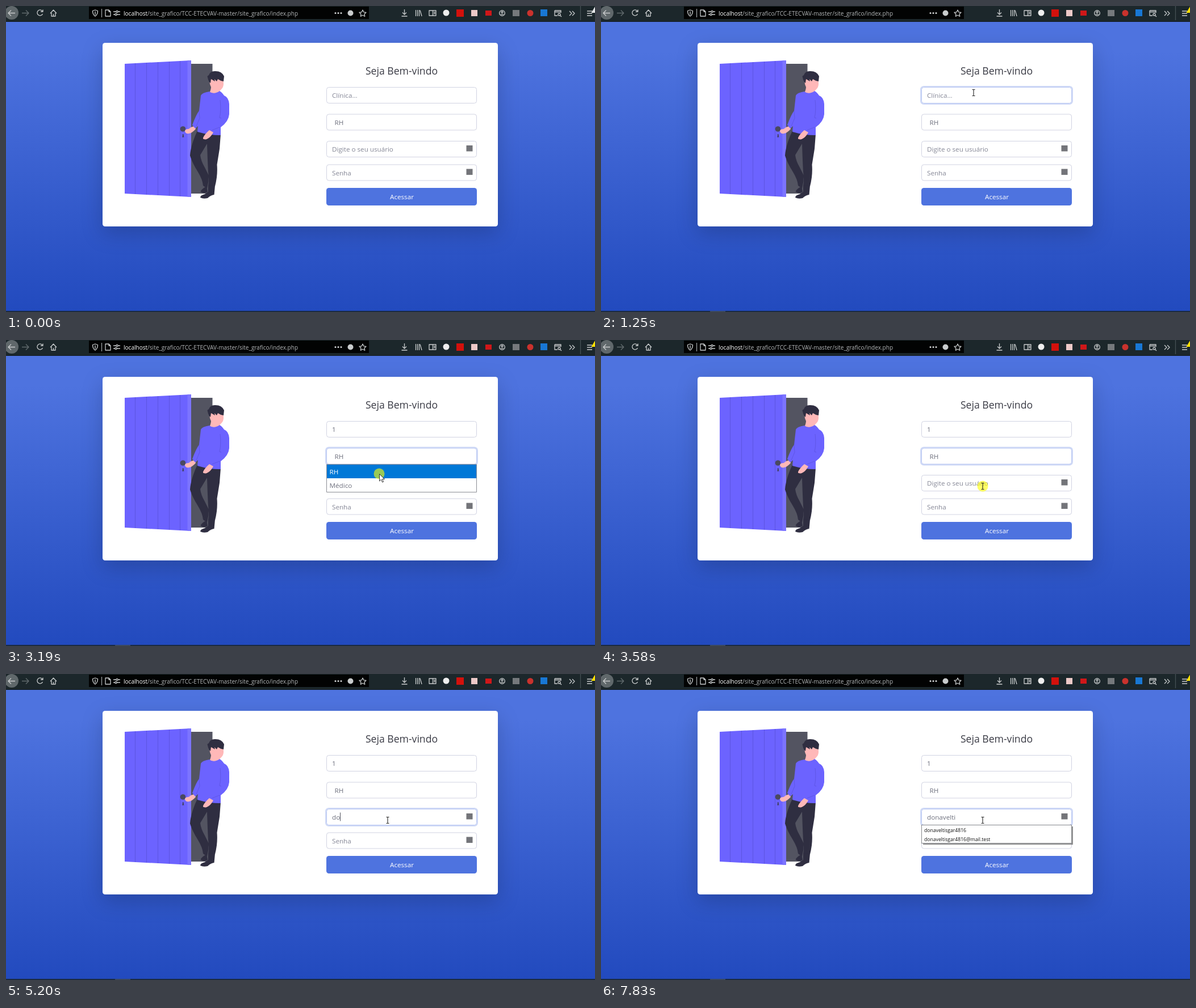
An HTML page for the animation above (8 s loop, 1037 by 540 pixels).

```html
<!DOCTYPE html>
<html lang="pt-BR">
<head>
<meta charset="utf-8">
<title>Seja Bem-vindo</title>
<style>
  html, body { margin: 0; width: 100%; height: 100%; overflow: hidden; background: #224abe; }
  svg { display: block; width: 100vw; height: 100vh; }
  text { font: 11.66px "Open Sans", "Noto Sans", sans-serif; fill: #6e707e; white-space: pre; }
  .hint { fill: #858796; }
  .small { font-size: 8.65px; fill: #111; }
  .card { filter: drop-shadow(0 12px 18px rgba(0, 0, 0, .18)); }
  .icon { fill: none; stroke: #c9cccd; stroke-width: 1.3; stroke-linejoin: round; }
  .field { fill: #fff; stroke: #d1d3e2; }
  .focus .field { stroke: #bac8f3; }
  .ring { fill: none; stroke: #4e73df; stroke-opacity: .27; stroke-width: 2.4; visibility: hidden; }
  .focus .ring { visibility: visible; }
</style>
</head>
<body>
<svg viewBox="0 0 1037 540" preserveAspectRatio="none">
  <defs>
    <linearGradient id="sky" x1="0" y1="0" x2="0" y2="1">
      <stop offset=".1" stop-color="#4e73df"/><stop offset="1" stop-color="#224abe"/>
    </linearGradient>
  </defs>
  <rect y="28" width="1037" height="512" fill="url(#sky)"/>
  <rect y="538" width="1037" height="2" fill="#1b2b42"/>
  <rect id="taskbar" x="192" y="538" width="27" height="2" fill="#3b4960"/>

  <!-- browser toolbar -->
  <rect width="1037" height="28" fill="#1c272b"/>
  <rect y="27" width="1037" height="1" fill="#11191d"/>
  <rect x="146" y="1" width="493" height="22" fill="#020303"/>
  <circle cx="10" cy="12" r="12" fill="#60686b"/>
  <g class="icon">
    <path d="M4 12.5H16M9 7.5L4 12.5L9 17.5"/>
    <path d="M28 12.5H40M35 7.5L40 12.5L35 17.5" stroke="#626b6e"/>
    <path d="M64 9A5 5 0 1 0 64.500 14M65 6.500V10H61"/>
    <path d="M78 13L83.500 7L89 13M80 12V18H87V12M83.500 18V14"/>
    <path d="M157 7L161.500 8.500Q161.500 15 157 18Q152.500 15 152.500 8.500ZM157 9.500V15.500"/>
    <path d="M168.500 5V20" stroke="#9da1a3"/>
    <path d="M175 7H181L184 10V18H175ZM181 7V10H184"/>
    <path d="M189 10H194M197 10H201M189 15H192M195 15H201"/>
    <circle cx="195.500" cy="10" r="1.600"/><circle cx="193.500" cy="15" r="1.600"/>
    <path d="M628 7L629.800 10.800L634 11.300L631 14.200L631.700 18.300L628 16.300L624.300 18.300L625 14.200L622 11.300L626.200 10.800Z"/>
    <path d="M701.500 6V15M698 11.500L701.500 15L705 11.500M696.500 18H706.500"/>
    <path d="M721.500 7V18M724.500 7V18M727.500 7V18M729 7.500L732 18"/>
    <path d="M745 8H757V17H745ZM751.500 8V17M753 11H756M753 13.500H756"/>
    <circle cx="873.500" cy="12.500" r="4.800"/><circle cx="873.500" cy="11" r="1.500"/><path d="M871 15H876"/>
    <path d="M966 8H977V12M966 8V17H971M966 10.500H977"/><circle cx="974" cy="15" r="2"/><path d="M975.500 16.500L978 19"/>
    <path d="M992 9L996 13L992 17M997 9L1001 13L997 17"/>
    <path d="M1011.500 0V25" stroke="#465055"/>
    <path d="M1023 9H1032M1023 13H1032M1023 17H1032"/>
  </g>
  <g fill="#d5d7d8"><circle cx="580" cy="12.500" r="1.500"/><circle cx="585" cy="12.500" r="1.500"/><circle cx="590" cy="12.500" r="1.500"/></g>
  <circle cx="606.500" cy="12.500" r="5" fill="#c9cccd"/>
  <circle cx="775" cy="12" r="5.500" fill="#eee"/>
  <rect x="793" y="6" width="13" height="13" fill="#d3110c"/>
  <rect x="819" y="7" width="11" height="11" fill="#ecc9c8"/>
  <rect x="844" y="8" width="11" height="9" fill="#cf1719"/>
  <rect x="892" y="7" width="12" height="11" fill="#75797c"/>
  <circle cx="923" cy="12.500" r="5.500" fill="#c9322d"/>
  <rect x="941" y="6" width="12" height="12" fill="#1877d4"/>
  <path id="badge" d="M1037 1L1030.500 12H1043.500Z"/>
  <text x="207" y="17" style="font-size:10.05px;fill:#b5b8ba"><tspan fill="#fff">localhost</tspan>/site_grafico/TCC-ETECVAV-master/site_grafico/index.php</text>

  <rect class="card" x="170" y="65" width="696" height="324" rx="4.500" fill="#fff"/>

  <!-- door -->
  <path d="M326 102H363.500V331H326Z" fill="#535461"/>
  <path d="M209 102L326 96V337L209 331Z" fill="#6c63ff"/>
  <path d="M319.500 96.300L326 96V337L319.500 336.700Z" fill="#7c74ff"/>
  <path d="M227.500 101V332M247.500 100V333M267.500 99V334M287.500 98V335M306.500 97V336" fill="none" stroke="#5c54e0"/>
  <circle cx="311.500" cy="217" r="4.800" fill="#4a4960"/>
  <path d="M310.500 226.500H313L312.600 229L313.500 231.500H310L311 229Z" fill="#3f3d56"/>

  <!-- visitor -->
  <g fill="#2f2e41">
    <path d="M337 220L378 226L376 252L371.500 280Q373 299 368 318L356 318Q358 305 356 293Q355 276 354 243L342 263Q343 273 350 285L357 299Q357 310 354 322L347 317Q346 306 338 293Q328 277 324 264Q325 246 337 220Z"/>
    <path d="M353 318L347 322Q342 326 343 328Q348 332 355 328Z"/>
    <path d="M356 316L368 317L366.500 333Q360 334 355 339Q347 341 342 338Q342 334 350 332L356 328Z"/>
  </g>
  <g fill="#ffb8b8">
    <path d="M333 212Q325 213 322 217Q315 217 315 221Q316 226 322 225Q328 224 334 217Z"/>
    <path d="M358 219L365 223Q360 232 353 235Q347 236 347 233Q350 226 358 219Z"/>
    <path d="M359 128L382 128Q385 141 380 146Q376 149 375 153L367 158L358 154Q361 147 361 143Q357 135 359 128Z"/>
  </g>
  <path d="M358 151Q366 157 376 150Q380 152 384 158Q392 161 393 173V191Q392 204 378 214L378 228Q357 228 337 222L338 212L333 216L328 210Q335 191 340 185L343 158Q345 153 358 151Z" fill="#6c63ff"/>
  <path d="M377 166Q379 185 376 197L379 198M363 219L376 214M340 185L341 198L335 212" fill="none" stroke="#5c54e0" stroke-width=".8"/>
  <path d="M358 219L365 223Q360 232 353 235Q347 236 347 233Q350 226 358 219Z" fill="#ffb8b8"/>
  <path d="M356 130L354.500 124L357 122Q360 114 369 115Q380 115 384 124L383 133Q377 132 373 129L371 133L367 129L368 133L361 129L360 136Q357 134 356 130Z" fill="#2f2e41"/>

  <text x="696.500" y="121" text-anchor="middle" style="font-size:17.6px;fill:#3a3b45">Seja Bem-vindo</text>
  <g id="fields"></g>
  <rect x="564" y="321" width="265" height="31" rx="4.500" fill="#4e73df"/>
  <text x="697" y="341" text-anchor="middle" style="fill:#fff">Acessar</text>

  <g id="options">
    <path d="M564.500 219.500H828.500V268.500H564.500Z" fill="#fff" stroke="#8b8d94"/>
    <path d="M565 220H828V244H565Z" fill="#0078d7"/>
    <text x="569.500" y="237" style="fill:#fff">RH</text>
    <text x="569.500" y="261">Médico</text>
  </g>
  <g id="suggest">
    <rect id="shade" x="567" y="269" width="264" fill="#000" opacity=".42"/>
    <rect id="panel" x="564.500" y="266.500" width="264" fill="#fff" stroke="#85878c"/>
    <text class="small" x="569" y="279"></text>
    <text class="small" x="569" y="294.500"></text>
    <text class="small" x="569" y="310"></text>
  </g>
  <g id="tooltip">
    <path d="M670.500 274.500H769.500V289.500H670.500Z" fill="#fff" stroke="#666"/>
    <text class="small" x="675" y="286">Preencha este campo.</text>
  </g>
  <rect id="caret" width="1" height="15" fill="#50525f"/>
  <g id="cursor">
    <circle id="click" r="9.500" fill="#ff0" opacity=".6"/>
    <path id="arrow" d="M.5 .5V13L3.500 10.200L5.600 15L7.600 14.100L5.600 9.500H9.500Z" fill="#fff" stroke="#222" stroke-width=".9"/>
    <path id="beam" d="M-2.500 -5.500H-.7L0 -5L.7 -5.500H2.500M0 -5V5M-2.500 5.500H-.7L0 5L.7 5.500H2.500" fill="none" stroke="#222" stroke-width="1.100"/>
  </g>
</svg>
<script>
const LOOP = 8000;
const $ = id => document.getElementById(id);
const show = (id, on) => $(id).setAttribute("visibility", on ? "visible" : "hidden");

const fields = [
  { y: 143, x: 574, hint: "Clínica..." },
  { y: 190.5, x: 578.5, value: "RH" },
  { y: 238, x: 574, hint: "Digite o seu usuário", badge: true },
  { y: 279.5, x: 574, hint: "Senha", badge: true }
];
$("fields").innerHTML = fields.map(({ y, x, badge }) => `<g>
  <rect class="ring" x="563.2" y="${y - .8}" width="266.600" height="30.600" rx="5"/>
  <rect class="field" x="564.5" y="${y + .5}" width="264" height="28" rx="4"/>
  <text x="${x}" y="${y + 19.3}"></text>
  ${badge ? `<rect x="810.5" y="${y + 8}" width="11" height="10.500" fill="#737479"/>` : ""}</g>`).join("");
const groups = [...$("fields").children];
const labels = groups.map(g => g.querySelector("text"));
const rows = [...$("suggest").querySelectorAll("text")];

const long = ["donaveltisgar4816", "Donavel_Tisgar", "donaveltisgar4816@mail.test"];
const short = [long[0], long[2]];

// Each step changes part of the state that came before it.
const steps = [
  [0, { focus: -1, clinic: "", user: "", caret: false, list: [] }],
  [690, { click: true, focus: 0, caret: true }],
  [760, { click: false }],
  [830, { alert: true }],
  [1250, { caret: false }],
  [1720, { caret: true }],
  [1800, { clinic: "1" }],
  [2570, { click: true }],
  [2640, { click: false, focus: 1, open: true }],
  [3190, { click: true }],
  [3270, { click: false, open: false }],
  [3580, { click: true }],
  [3650, { click: false, focus: 2, caret: true }],
  [4110, { tip: true }],
  [4190, { caret: false }],
  [4650, { caret: true }],
  [5120, { user: "d", tip: false }],
  [5200, { user: "do" }],
  [5280, { list: long }],
  [5430, { user: "don" }],
  [5660, { user: "dona" + "v" }],
  [5810, { user: "donave" }],
  [5900, { user: "donavel" }],
  [6210, { caret: false }],
  [6760, { caret: true }],
  [7220, { user: "donavelt", caret: true }],
  [7290, { user: "donavelti" }],
  [7370, { list: short }],
  [7830, { caret: false }]
];

// time, x, y of the pointer
const path = [
  [70, 736, 52], [200, 690, 115], [310, 612, 200], [390, 640, 170], [470, 656, 153],
  [2260, 656, 153], [2490, 663, 206], [2720, 663, 206], [3040, 658, 234], [3110, 657, 236],
  [3270, 657, 236], [3500, 672, 258]
];

function pointerAt(t) {
  const next = path.findIndex(p => p[0] > t);
  if (next < 0) return path.at(-1).slice(1);
  if (next === 0) return null;
  const [a, b] = [path[next - 1], path[next]];
  const k = (t - a[0]) / (b[0] - a[0]);
  return [a[1] + (b[1] - a[1]) * k, a[2] + (b[2] - a[2]) * k];
}

function drawPointer(t, state) {
  const point = pointerAt(t);
  show("cursor", point);
  if (!point) {
    ["click", "arrow", "beam"].forEach(id => show(id, false));
    return;
  }
  const [x, y] = point;
  const overInput = !state.open && x > 564 && x < 829 &&
    [0, 2, 3].some(i => y > fields[i].y && y < fields[i].y + 29);
  $("cursor").setAttribute("transform", `translate(${Math.round(x)} ${Math.round(y)})`);
  show("click", state.click);
  show("arrow", !overInput);
  show("beam", overInput);
}

function draw(t) {
  const state = Object.assign({}, ...steps.filter(s => s[0] <= t).map(s => s[1]));
  const values = [state.clinic, "RH", state.user, ""];
  fields.forEach((field, i) => {
    groups[i].setAttribute("class", i === state.focus ? "focus" : "");
    labels[i].textContent = values[i] || field.hint;
    labels[i].setAttribute("class", values[i] ? "" : "hint");
  });

  const typing = state.focus === 0 || state.focus === 2;
  show("caret", state.caret && typing);
  if (typing) {
    const i = state.focus;
    const width = values[i] ? labels[i].getComputedTextLength() : 0;
    $("caret").setAttribute("x", Math.round(fields[i].x + width));
    $("caret").setAttribute("y", fields[i].y + 6.5);
  }

  show("options", state.open);
  show("tooltip", state.tip);
  show("suggest", state.list.length);
  const height = 1 + state.list.length * 15.6;
  $("panel").setAttribute("height", height);
  $("shade").setAttribute("height", height);
  rows.forEach((row, i) => { row.textContent = state.list[i] || ""; });

  show("taskbar", state.alert);
  $("badge").setAttribute("fill", state.alert ? "#ffe100" : "#e4e6e7");
  drawPointer(t, state);
}

function tick() {
  draw(performance.now() % LOOP);
  requestAnimationFrame(tick);
}
tick();
</script>
</body>
</html>
```
